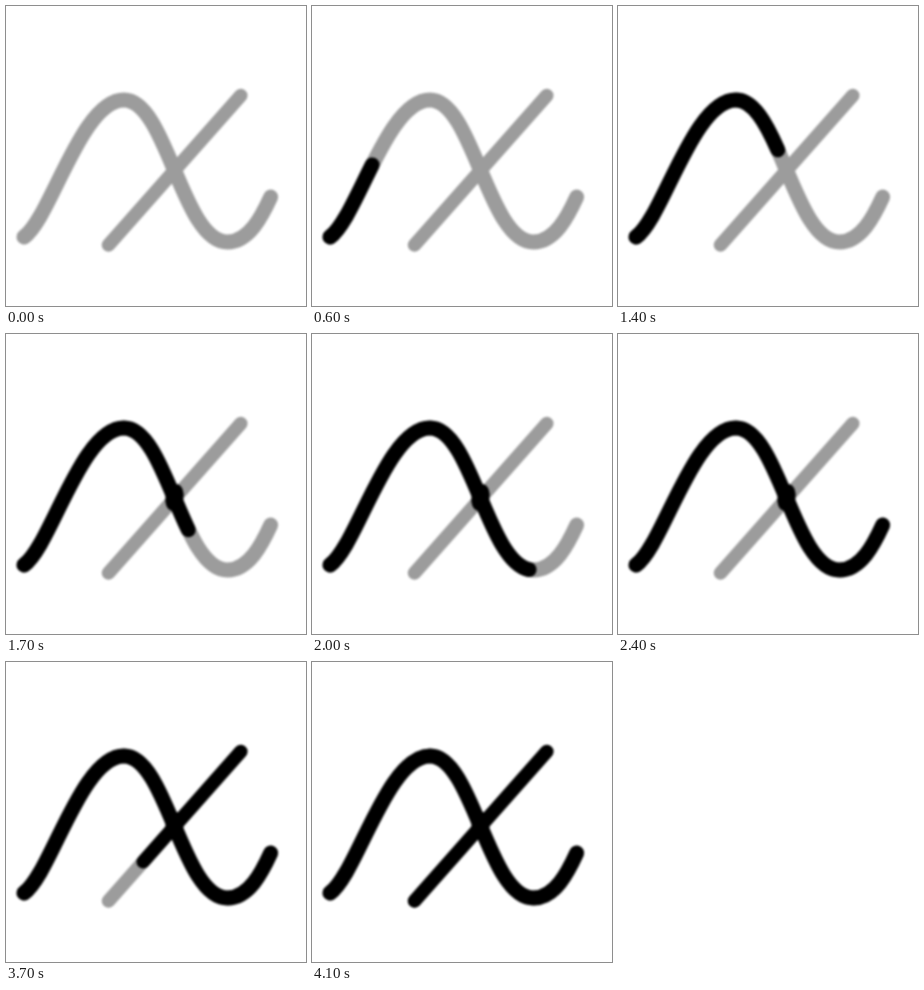
Animation of 300 by 300 pixels, one loop 5200 ms. Source, as an HTML page:

```html
<!DOCTYPE html>
<html lang="en">
<head>
<meta charset="utf-8">
<title>Letter stroke order</title>
<style>
  html, body { margin: 0; width: 100%; height: 100%; overflow: hidden; background: #fff; }
  svg { display: block; width: 100%; height: 100%; }
</style>
</head>
<body>
<svg viewBox="0 0 300 300">
  <defs>
    <filter id="soft" color-interpolation-filters="sRGB"><feGaussianBlur stdDeviation="0.9"/></filter>
    <path id="curve" pathLength="1" stroke-width="15"
      d="M18 231C45 212 75 94 118 94S176 236 221.5 236C243 236 256 210 264.7 191"/>
    <path id="slash" pathLength="1" stroke-width="13.5" d="M234.8 89.5L102.5 239"/>
  </defs>
  <g filter="url(#soft)" fill="none" stroke-linecap="round">
    <g stroke="#9c9c9c"><use href="#slash"/><use href="#curve"/></g>
    <ellipse id="crossing" rx="9" ry="13.5" transform="translate(168.5 163.5) rotate(12)" fill="#000"/>
    <g stroke="#000"><use id="slashInk" href="#slash"/><use id="curveInk" href="#curve"/></g>
  </g>
</svg>
<script>
const LOOP = 5200, STEP = 100;
const el = id => document.getElementById(id);

// Fraction of a stroke drawn, advancing once per step.
const progress = (t, start, steps) =>
  Math.min(1, Math.max(0, Math.floor((t - start) / STEP) / steps));
const easeOut = u => u * (1 + 0.11 * (1 - u));
const show = (node, visible) => node.setAttribute("visibility", visible ? "visible" : "hidden");

function ink(node, fraction) {
  node.setAttribute("stroke-dasharray", `${fraction} 2`);
  show(node, fraction > 0);
}

function draw(time) {
  const t = time % LOOP;
  const curve = easeOut(progress(t, 200, 22));
  ink(el("curveInk"), curve);
  ink(el("slashInk"), progress(t, 2800, 12.2));
  show(el("crossing"), curve > 0.63);
}

const begin = performance.now();
function tick() {
  draw(performance.now() - begin);
  requestAnimationFrame(tick);
}
tick();
</script>
</body>
</html>
```
